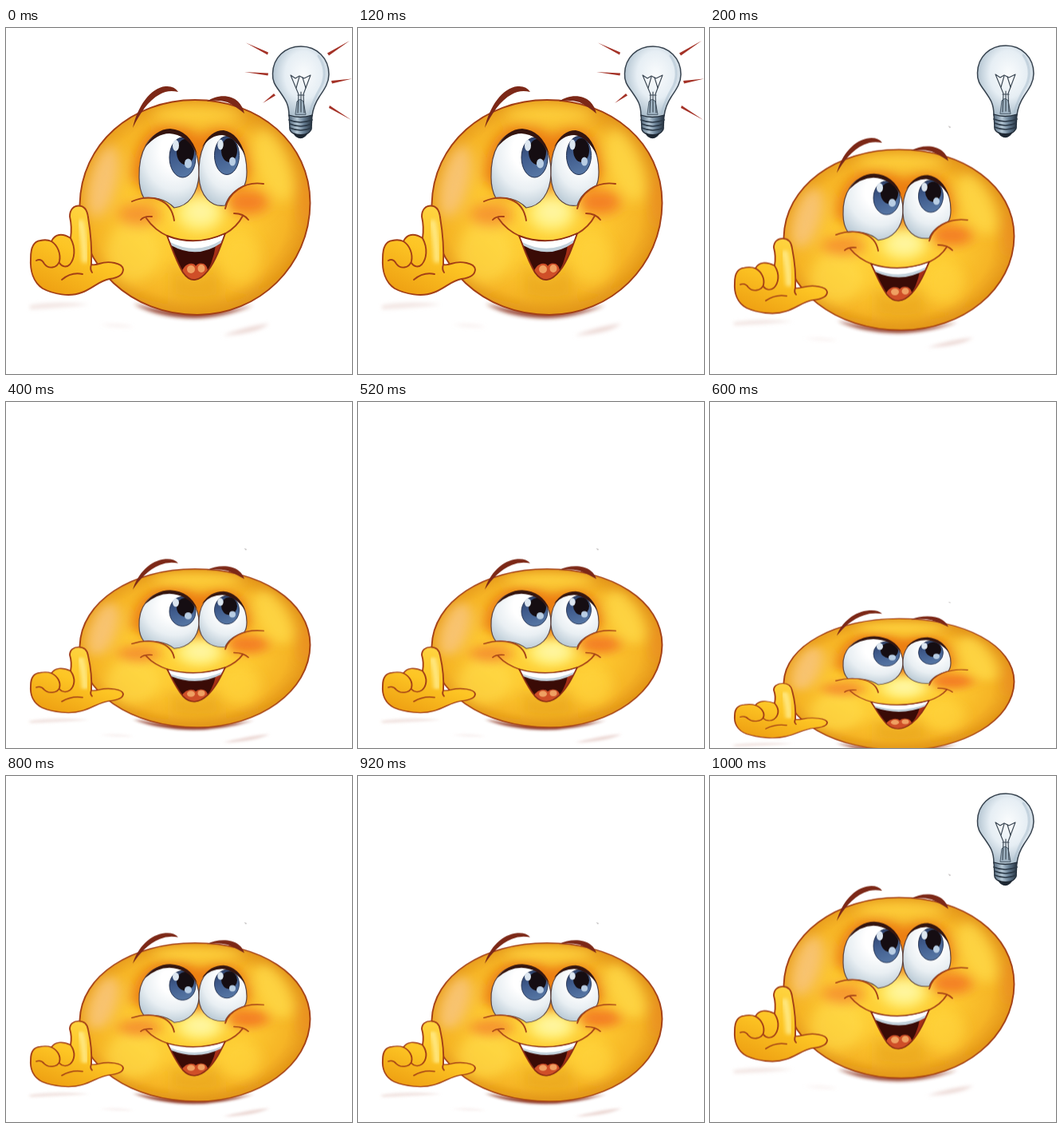
Write an HTML page that moves like this. It is 434 by 433 pixels and loops after 1.2 s.

```html
<!DOCTYPE html>
<html lang="en">
<head>
<meta charset="utf-8">
<title>Bright idea</title>
<style>
html, body { margin: 0; width: 100%; height: 100%; overflow: hidden; background: #fff; }
svg { display: block; width: 100%; height: 100%; }
.toon { animation: squash 1.2s step-end infinite; }
.bulb { animation: blink 1.2s step-end infinite; }
.rays { animation: flash 1.2s step-end infinite; }
.speck { animation: dot 1.2s step-end infinite; }
.line { fill: none; stroke: #a33f16; stroke-width: 1.9; stroke-linecap: round; stroke-linejoin: round; }
.rim { fill: none; stroke: #5d4440; stroke-width: 1.2; }
.brow { fill: #7c2817; }
.soft { filter: url(#blur); }
@keyframes squash {
  0%, 100% { transform: none; }
  16.6667%, 83.3333% { transform: matrix(1, 0, 0, .841, 0, 76.3); }
  33.3333%, 66.6667% { transform: matrix(1, 0, 0, .737, 0, 142.7); }
  50% { transform: matrix(1, 0, 0, .612, 0, 216); }
}
@keyframes blink {
  0%, 100% { transform: none; visibility: visible; }
  16.6667%, 83.3333% { transform: translate(1px, -1px); visibility: visible; }
  33.3333% { transform: translate(1px, -1px); visibility: hidden; }
}
@keyframes flash {
  0%, 100% { visibility: visible; }
  16.6667% { visibility: hidden; }
}
@keyframes dot {
  0%, 100% { visibility: hidden; }
  16.6667% { visibility: visible; }
}
</style>
</head>
<body>
<svg viewBox="0 0 434 433" preserveAspectRatio="none">
  <defs>
    <filter id="blur" x="-50%" y="-50%" width="200%" height="200%"><feGaussianBlur stdDeviation="8"/></filter>
    <filter id="haze" x="-50%" y="-150%" width="200%" height="400%"><feGaussianBlur stdDeviation="2.5"/></filter>
    <radialGradient id="skin" cx=".48" cy=".5" r=".53">
      <stop offset="0" stop-color="#ffd83c"/>
      <stop offset=".5" stop-color="#fdc931"/>
      <stop offset=".8" stop-color="#f6b526"/>
      <stop offset="1" stop-color="#e2921a"/>
    </radialGradient>
    <linearGradient id="palm" x1=".7" y1="0" x2=".2" y2="1">
      <stop offset="0" stop-color="#ffd645"/>
      <stop offset=".5" stop-color="#fdc524"/>
      <stop offset="1" stop-color="#ee9f12"/>
    </linearGradient>
    <radialGradient id="white" cx=".6" cy=".25" r=".8">
      <stop offset=".3" stop-color="#fff"/>
      <stop offset=".65" stop-color="#e9eff3"/>
      <stop offset="1" stop-color="#b7c8d4"/>
    </radialGradient>
    <linearGradient id="iris" x1="0" y1="0" x2=".3" y2="1">
      <stop offset="0" stop-color="#2a3b62"/>
      <stop offset=".5" stop-color="#3f5b8c"/>
      <stop offset="1" stop-color="#5474a2"/>
    </linearGradient>
    <radialGradient id="glass" cx=".55" cy=".4" r=".6">
      <stop offset="0" stop-color="#fafcfd"/>
      <stop offset=".55" stop-color="#e6eef4"/>
      <stop offset="1" stop-color="#aabdcb"/>
    </radialGradient>
    <linearGradient id="metal">
      <stop offset="0" stop-color="#53687c"/>
      <stop offset=".35" stop-color="#b5c8d6"/>
      <stop offset=".65" stop-color="#667d92"/>
      <stop offset="1" stop-color="#25323f"/>
    </linearGradient>
    <path id="face" d="M92.500 221C94 145 158 90 237 90C318 90 381.500 144 381.500 219C381 298 317 359 240 359C157 359 92 299 92.500 221Z"/>
    <path id="eyeL" d="M167 187C166 156 179 129 203 129C228 129 243 153 242 183C241 207 229 223 211 225C199 212 184 212 173 213C169 206 167 197 167 187Z"/>
    <path id="eyeR" d="M242 185C241 155 250 132 271 131C292 131 302 156 302 180C302 188 301 193 299 197C286 203 278 212 275 222C258 225 243 211 242 185Z"/>
    <path id="mouth" d="M202 260Q238 274 275 257C269 274 263 291 253 304C242 318 231 319 222 306C213 291 208 275 202 260Z"/>
    <clipPath id="inFace"><use href="#face"/></clipPath>
    <clipPath id="inL"><use href="#eyeL"/></clipPath>
    <clipPath id="inR"><use href="#eyeR"/></clipPath>
    <clipPath id="inMouth"><use href="#mouth"/></clipPath>
  </defs>

  <g class="toon">
    <g filter="url(#haze)" fill="#e8cfca">
      <path d="M30 347Q65 341 104 346Q70 350 30 352Z" opacity=".55"/>
      <path d="M272 385Q302 373 330 370Q316 382 272 385Z" opacity=".8"/>
      <path d="M118 371Q145 369 160 374Q140 376 118 371Z" opacity=".35"/>
      <path d="M160 345Q235 366 310 347Q270 363 235 363Q190 362 160 345Z" fill="#8e3420"/>
    </g>

    <use href="#face" fill="url(#skin)"/>
    <g clip-path="url(#inFace)">
      <g class="soft">
        <ellipse cx="122" cy="192" rx="17" ry="46" fill="#f8c682" opacity=".8" transform="rotate(14 122 192)"/>
        <ellipse cx="160" cy="280" rx="34" ry="38" fill="#ffde4c" opacity=".6"/>
        <ellipse cx="335" cy="172" rx="20" ry="48" fill="#ffdd4a" opacity=".75" transform="rotate(-20 335 172)"/>
        <ellipse cx="240" cy="108" rx="56" ry="10" fill="#ffd643" opacity=".8"/>
        <path d="M158 190C158 148 178 121 205 121Q230 121 242 135Q262 120 283 128Q307 144 308 186L290 200L180 210Z" fill="#ea770f" opacity=".9"/>
        <ellipse cx="303" cy="218" rx="27" ry="16" fill="#f37d25" opacity=".95"/>
        <ellipse cx="167" cy="234" rx="27" ry="15" fill="#f58e2e" opacity=".85"/>
        <ellipse cx="376" cy="215" rx="8" ry="34" fill="#f08a28" opacity=".6"/>
        <ellipse cx="294" cy="288" rx="25" ry="32" fill="#ffd53c" opacity=".7"/>
        <path d="M208 290Q238 335 262 292L272 336Q240 346 208 336Z" fill="#e9a51c" opacity=".7"/>
        <path d="M105 290Q150 350 240 347Q330 346 370 276L382 310L320 370H145Z" fill="#df9413" opacity=".6"/>
        <ellipse cx="243" cy="232" rx="29" ry="23" fill="#fff07a"/>
        <ellipse cx="244" cy="229" rx="17" ry="13" fill="#fff5a0"/>
      </g>
    </g>
    <use href="#face" class="line"/>

    <use href="#eyeL" fill="url(#white)"/>
    <g clip-path="url(#inL)">
      <ellipse cx="221.500" cy="162" rx="16.500" ry="25" fill="url(#iris)" stroke="#22304f"/>
      <ellipse cx="225" cy="155" rx="11" ry="16" fill="#150d12"/>
      <ellipse cx="228.500" cy="169.500" rx="4.500" ry="6" fill="#b9cee4"/>
      <ellipse cx="213" cy="147" rx="4" ry="7" fill="#dce6f0"/>
    </g>
    <use href="#eyeL" class="rim"/>
    <use href="#eyeR" fill="url(#white)"/>
    <g clip-path="url(#inR)">
      <ellipse cx="277" cy="159.500" rx="15.500" ry="24" fill="url(#iris)" stroke="#22304f"/>
      <ellipse cx="280" cy="153" rx="10" ry="15" fill="#150d12"/>
      <ellipse cx="284" cy="167" rx="4" ry="5.500" fill="#b9cee4"/>
      <ellipse cx="269" cy="146" rx="3.700" ry="6.500" fill="#dce6f0"/>
    </g>
    <use href="#eyeR" class="rim"/>
    <path fill="#35150f" d="M174 150Q187 126 206 126Q231 128 240 158Q226 133 205 132Q189 132 174 150ZM246 149Q256 128 273 128Q292 131 300 160Q288 136 271 134Q257 134 246 149Z"/>

    <path class="brow" d="M159 125C165 98 181 75 200 73Q211 72 216 80Q203 77 193 83C178 91 168 107 159 125Z"/>
    <path class="brow" d="M252 92C264 83 282 83 291 92Q297 98 299 107Q288 98 278 93Q265 89 252 92Z"/>

    <g class="line">
      <path d="M158 217C181 207 207 213 211 241"/>
      <path d="M275 226C279 207 298 191 323 195"/>
      <path d="M169 240Q173 235 183 236M176 238Q186 253 204 261"/>
      <path d="M286 232Q298 232 304 240M297 235Q290 249 274 258"/>
    </g>

    <use href="#mouth" fill="#3a0b06"/>
    <g clip-path="url(#inMouth)">
      <path d="M263 272L278 254L270 300L246 318Q260 294 263 272Z" fill="#a83018"/>
      <path d="M218 320Q219 298 230 295Q236 294 238 298Q241 293 248 295Q257 300 250 320Z" fill="#cf4f28"/>
      <ellipse cx="232" cy="302" rx="5" ry="5" fill="#efa062"/>
      <ellipse cx="245" cy="301" rx="4.500" ry="5" fill="#efa062"/>
      <path d="M200 258Q238 276 278 256L270 268Q240 288 207 271Z" fill="#fff"/>
      <path d="M206 268Q239 285 271 265L270 269Q240 290 207 272Z" fill="#c3d2dc"/>
    </g>
    <use href="#mouth" class="line" style="stroke:#8c2d14"/>

    <path d="M80 236C80 227 85 222.500 91 222.500C98 222.500 102 228 103 237C106 255 108 275 107 296Q111 297 117 295C129 291 146 294 147 302C147 310 137 313 130 314C117 316 109 326 95 331C80 337 59 333 46 326C34 318 30 303 31 288C31 276 34 267 43 266Q51 264 57 267C61 258 70 256 81 263Q83 249 80 236Z" class="line" style="fill:url(#palm)"/>
    <path d="M94 244Q98 262 99 290" fill="none" stroke="#ffef95" stroke-width="8" stroke-linecap="round" opacity=".8" filter="url(#haze)"/>
    <g class="line">
      <path d="M57 267C65 272 69 283 67 292C64 301 53 302 48 295Q44 288 38 291"/>
      <path d="M81 263C88 276 86 289 80 296C76 300 70 299 67 294"/>
      <path d="M107 296Q105 302 108 306"/>
      <path d="M70 315Q82 305 96 308"/>
    </g>
    <path class="speck" d="M298.500 55L302 56.500L301 58Z" fill="#aaa6a6"/>
  </g>

  <g class="rays" fill="#a43227">
    <path d="M301 18.500L329 30.500L328 33.500Z"/>
    <path d="M299 55L329 56.500L328.500 59.500Z"/>
    <path d="M322 94L336 82L338 84.500Z"/>
    <path d="M431 16L403 31.500L405 34.500Z"/>
    <path d="M434 63.500L408 66L409 69.500Z"/>
    <path d="M433 115L406 97L405 100Z"/>
  </g>

  <g class="bulb" stroke-linecap="round" stroke-linejoin="round">
    <path d="M355 110C355 95 350 89 343 79C337 71 334 66 334.500 57C335 37 350 23 370 23C390 23 405 38 405 58C405 69 399 77 393 86C387 95 385 101 384 110Q369 115 355 110Z" fill="url(#glass)" stroke="#36424e" stroke-width="1.500"/>
    <path d="M392 35Q404 53 396 72Q385 91 381 106" fill="none" stroke="#9fb5c5" stroke-width="3" opacity=".4"/>
    <path d="M363 108L365 92Q369 87 373 92L376 108Z" fill="#9fb3c2" stroke="#4c5c6a"/>
    <g fill="none" stroke="#36424e" stroke-width="1.100">
      <path d="M366 106L367 83L357 59L363 63L368 60L374 63L382 59L373 83L374 106"/>
      <path d="M364 75L368 61M376 75L372 62M370 80V105M366 84H374"/>
    </g>
    <path d="M355 109Q369 114 384 109L383 127Q380 132 376 133Q370 142 363 133Q357 131 356 127Z" fill="url(#metal)" stroke="#25303c" stroke-width="1.300"/>
    <path d="M355 115Q369 121 384 115M356 120Q370 126 383 120M356 125Q370 131 383 125" fill="none" stroke="#2c3a48" stroke-width="1.700"/>
    <path d="M360 131Q370 135 379 131Q375 138.500 369 138Q363 138 360 131Z" fill="#1e2833"/>
  </g>
</svg>
</body>
</html>
```
